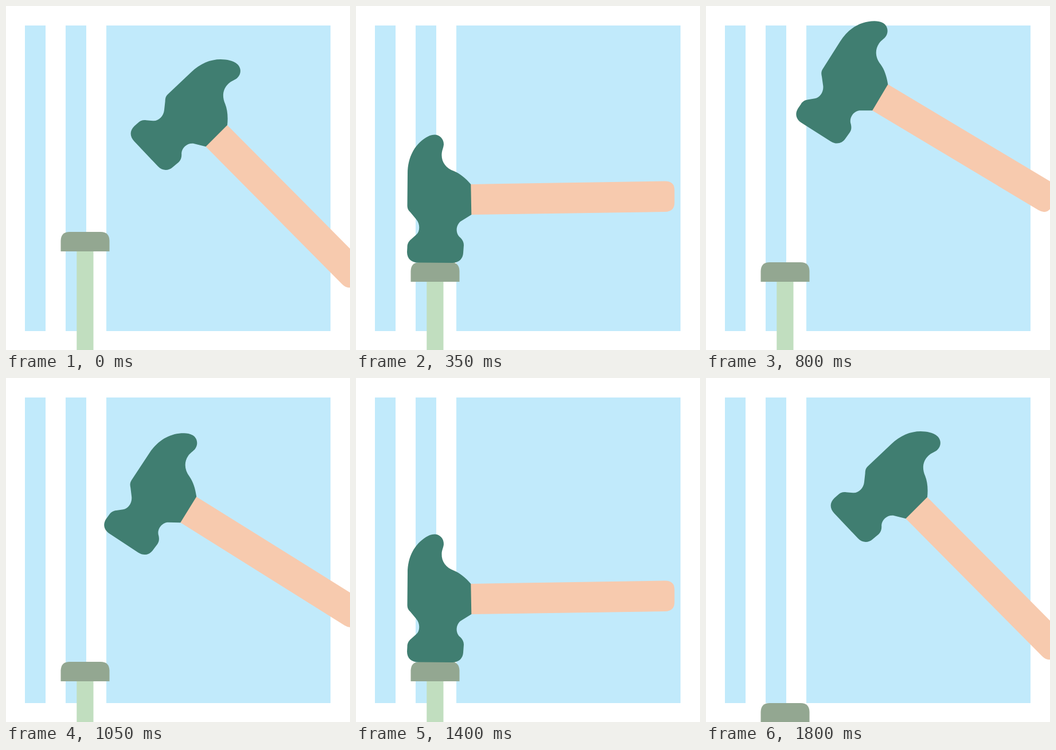
Write an HTML page that moves like this. It is 600 px wide and 600 px high and loops after 1.85 s.

```html
<!DOCTYPE html>
<html lang="en">
<head>
<meta charset="utf-8">
<title>Hammer and nail</title>
<style>
  html, body { margin: 0; width: 100%; height: 100%; overflow: hidden; background: #fff; }
  svg { display: block; width: 100%; height: 100%; }
</style>
</head>
<body>
<svg viewBox="0 0 600 600">
  <path fill="#c1eafb" d="M33 34h36v533h-36zM104 34h36v533h-36zM175 34h391v533h-391z"/>
  <g id="nail">
    <path fill="#c1debf" d="M123.3 30h29.2v600h-29.2z"/>
    <path fill="#93a791" d="M95.5 34V16Q95.5 0 111 0H165Q180.500 0 180.500 16V34z"/>
  </g>
  <g id="hammer">
    <path fill="#f7caae" d="M199 359L539 353.500Q555.500 353.500 555.500 369V391Q555.500 406.500 539 407L200 412z"/>
    <path fill="#407e71" d="M200.300 359C191 348 181 340 171 336C157 331 149 320 149.500 307
      C149.500 300 152.500 296 153 290C153.500 280 146 272.500 137 272.500C131 272.500 126 275 122 277.500
      C102 290 90 312 90 340L89.500 396C89.500 402 92 405 95 408L105 420C112 428 112 441 105 447
      L96 455C91 459 89.500 464 89.500 468L89 477C89 489 97 495.500 108 495.500L168 496
      C180 496 186.500 488 187 479L188 465C188 460 186 456 182 452C174 446 173 432 182 424L201.300 412z"/>
  </g>
</svg>
<script>
const LOOP = 1850, STEP = 50, REST = -0.9;
const nail = document.getElementById('nail');
const hammer = document.getElementById('hammer');

const linear = u => u;
const easeIn = u => u * u;
const strike = u => u * u * u;
const easeOut = u => 1 - (1 - u) ** 2;
const easeInOut = u => u * u * (3 - 2 * u);

// time, grip x, grip y, handle angle, easing towards this pose
const swing = [
  [0, 616.8, 478, 45.2],
  [250, 609.3, 321.9, 36, easeOut],
  [325, 555, 279, REST, easeIn],
  [350, 555, 332, REST, linear],
  [500, 612, 321, 32.5, linear],
  [570, 611, 307, 33, easeOut],
  [800, 607.7, 341.5, 30.9, easeInOut],
  [875, 555, 332, REST, easeIn],
  [900, 555, 380, REST, linear],
  [1050, 618.6, 417.4, 32, linear],
  [1120, 618, 393, 33, easeOut],
  [1400, 555, 380, REST, strike],
  [1450, 555, 452, REST, linear],
  [1650, 618, 457, 44, easeInOut],
  [1800, 616.8, 478, 45.2, easeInOut],
  [LOOP, 616.8, 478, 45.2, linear]
];

function poseAt(t) {
  const i = swing.findIndex(key => key[0] > t);
  const a = swing[i - 1], b = swing[i];
  const u = b[4]((t - a[0]) / (b[0] - a[0]));
  return [1, 2, 3].map(k => a[k] + (b[k] - a[k]) * u);
}

function nailTop(t) {
  return t < 350 ? 394 : t < 900 ? 447 : t < 1450 ? 495 : 567;
}

function draw(now) {
  const t = Math.floor(now % LOOP / STEP) * STEP;
  const [x, y, angle] = poseAt(t);
  nail.setAttribute('transform', `translate(0 ${nailTop(t)})`);
  hammer.setAttribute('transform',
    `translate(${x} ${y}) rotate(${angle - REST}) translate(-555 -380)`);
}

let start;
function frame(now) {
  start ??= now;
  draw(now - start);
  requestAnimationFrame(frame);
}
draw(0);
requestAnimationFrame(frame);
</script>
</body>
</html>
```
